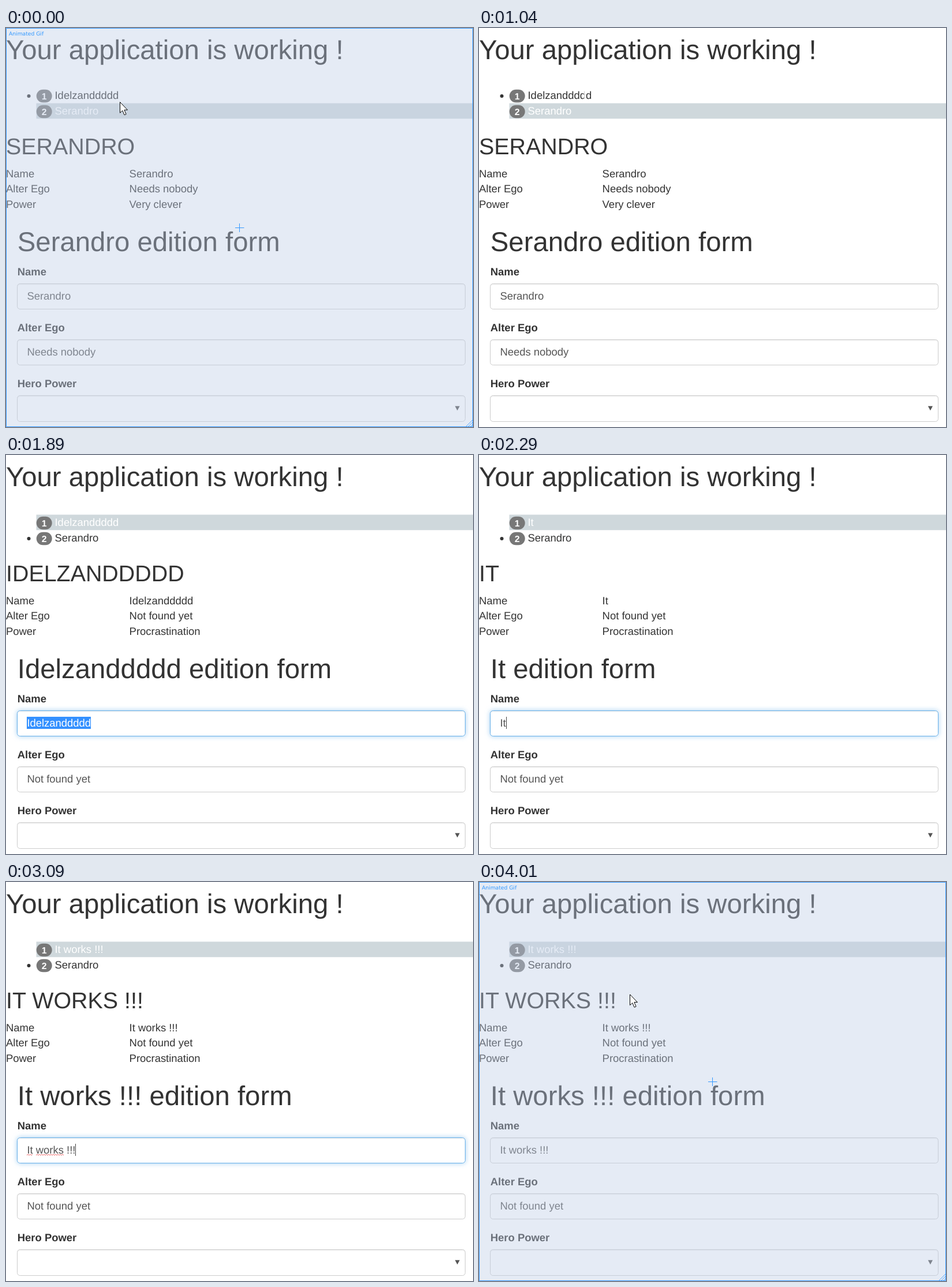
Recreate the animation shown at these times as an HTML page. Size 809x692 px, loop 4490 ms.

```html
<!DOCTYPE html>
<html lang="en">
<head>
<meta charset="utf-8">
<title>Hero editor</title>
<style>
  html, body { margin: 0; width: 100%; height: 100%; overflow: hidden; background: #fff; }
  .field {
    position: absolute; left: 19px; width: 777px; height: 45.2px; box-sizing: border-box;
    border: 1px solid #ccc; border-radius: 5.3px;
    box-shadow: inset 0 1.3px 1.3px rgba(0, 0, 0, .075);
  }
  .focus {
    border-color: #66afe9;
    box-shadow: inset 0 1.3px 1.3px rgba(0, 0, 0, .075), 0 0 8px rgba(102, 175, 233, .6);
  }
  svg { position: absolute; left: 0; top: 0; }
  text {
    font-family: "Liberation Sans", Arial, sans-serif; font-size: 18.45px;
    fill: #333; white-space: pre; text-rendering: geometricPrecision;
  }
  .h1 { font-size: 47.3px; }
  .h2 { font-size: 39.4px; }
  .bold { font-weight: bold; }
  .input { fill: #555; }
  .white { fill: #fff; }
  .badge { font-size: 15.8px; font-weight: bold; fill: #fff; text-anchor: middle; }
  .caption { font: 9.2px "DejaVu Sans", sans-serif; fill: #39f; }
</style>
</head>
<body>
<div class="field" id="name" style="top:442.8px"></div>
<div class="field" style="top:540.1px"></div>
<div class="field" style="top:637.4px"></div>
<svg id="stage" width="809" height="692" viewBox="0 0 809 692"></svg>
<script>
const LOOP = 4490;
const FIRST = 'Idelzanddddd', SECOND = 'Serandro';
const stage = document.getElementById('stage');
const nameField = document.getElementById('name');

// Each step holds until the next one starts. selected: index of the active list row.
const steps = [
  { at: 0, selected: 1, first: FIRST, pointer: [197.5, 128.5] },
  { at: 600, selected: 1, first: FIRST, pointer: [197.5, 117.5] },
  { at: 1040, selected: 1, first: FIRST, gap: true },
  { at: 1470, selected: 0, first: FIRST },
  { at: 1890, selected: 0, first: FIRST, focus: true, highlight: true },
  { at: 2290, selected: 0, first: 'It', focus: true, caret: 47.5 },
  { at: 2690, selected: 0, first: 'It work', focus: true, caret: 90.5, misspelt: [[36, 47]] },
  { at: 3090, selected: 0, first: 'It works !!!', focus: true, caret: 120.5, misspelt: [[36, 47], [52, 100]] },
  { at: 3540, selected: 0, first: 'It works !!!', focus: true, misspelt: [[36, 47], [52, 100]] },
  { at: 4010, selected: 0, first: 'It works !!!', pointer: [261.5, 195] }
];

const text = (x, y, content, cls = '') => `<text x="${x}" y="${y}" class="${cls}">${content}</text>`;
const rect = (x, y, w, h, fill, extra = '') =>
  `<rect x="${x}" y="${y}" width="${w}" height="${h}" fill="${fill}" ${extra}/>`;
const path = (d, stroke, fill = 'none', extra = '') =>
  `<path d="${d}" stroke="${stroke}" fill="${fill}" ${extra}/>`;

function listRow(index, name, active) {
  const y = 103.5 + index * 27;
  return (active ? rect(52.5, y, 757, 26.8, '#cfd8dc') : `<circle cx="39.5" cy="${y + 14.5}" r="3" fill="#333"/>`)
    + rect(52.7, y + 3.2, 27, 22.6, '#777', 'rx="11.3"')
    + text(66.2, y + 20.3, index + 1, 'badge')
    + text(84.5, y + 19.5, name, active ? 'white' : '');
}

function squiggle([from, to]) {
  let d = `M${from} 474`;
  for (let x = from + 2, up = true; x <= to; x += 2, up = !up) d += `L${x} ${up ? 472.3 : 474}`;
  return path(d, '#e55', 'none', 'stroke-width=".9"');
}

function recorderOverlay([x, y]) {
  return rect(0, 0, 809, 692, 'rgb(191,206,230)', 'opacity=".4"')
    + path('M.5 .5H808.5V691.5H.5Z', '#39f')
    + path('M397 346.5H412.5M404.5 339V354', '#39f')
    + path('M797 691L808 680M801 691L808 684M805 691L808 688', '#39f', 'none', 'stroke-width=".8"')
    + text(5, 13, 'Animated Gif', 'caption')
    + path('M0 0V18.7L4.3 14.7L7.6 22.3L10.6 21L7.4 13.6H13Z', '#000', '#fff', `transform="translate(${x} ${y})"`);
}

function draw(step) {
  const names = [step.first, SECOND];
  const hero = names[step.selected];
  const [ego, power] = step.selected ? ['Needs nobody', 'Very clever'] : ['Not found yet', 'Procrastination'];
  const details = [['Name', hero], ['Alter Ego', ego], ['Power', power]];
  const labels = ['Name', 'Alter Ego', 'Hero Power'];

  nameField.classList.toggle('focus', !!step.focus);
  stage.innerHTML = text(0, 54, 'Your application is working !', 'h1')
    + names.map((name, i) => listRow(i, name, i === step.selected)).join('')
    + (step.gap ? rect(182.3, 107, 2.6, 20, '#fff') : '')
    + text(0, 219, hero.toUpperCase(), 'h2')
    + details.map(([label, value], i) =>
        text(0, 259 + i * 26.36, label) + text(213.6, 259 + i * 26.36, value)).join('')
    + text(19.8, 387, hero + ' edition form', 'h1')
    + labels.map((label, i) => text(19.8, 429 + i * 97.2, label, 'bold')).join('')
    + (step.highlight ? rect(36, 454, 111, 21, '#3390ff') : '')
    + text(36.4, 470.6, hero, step.highlight ? 'white' : 'input')
    + text(36.4, 568, ego, 'input')
    + path('M777.8 655.8H786L781.9 663.6Z', 'none', '#555')
    + (step.misspelt || []).map(squiggle).join('')
    + (step.caret ? path(`M${step.caret} 454V475`, '#444') : '')
    + (step.pointer ? recorderOverlay(step.pointer) : '');
}

let shown;
function tick() {
  const time = performance.now() % LOOP;
  const step = steps.findLast(s => s.at <= time);
  if (step !== shown) draw(shown = step);
  requestAnimationFrame(tick);
}
tick();
</script>
</body>
</html>
```
